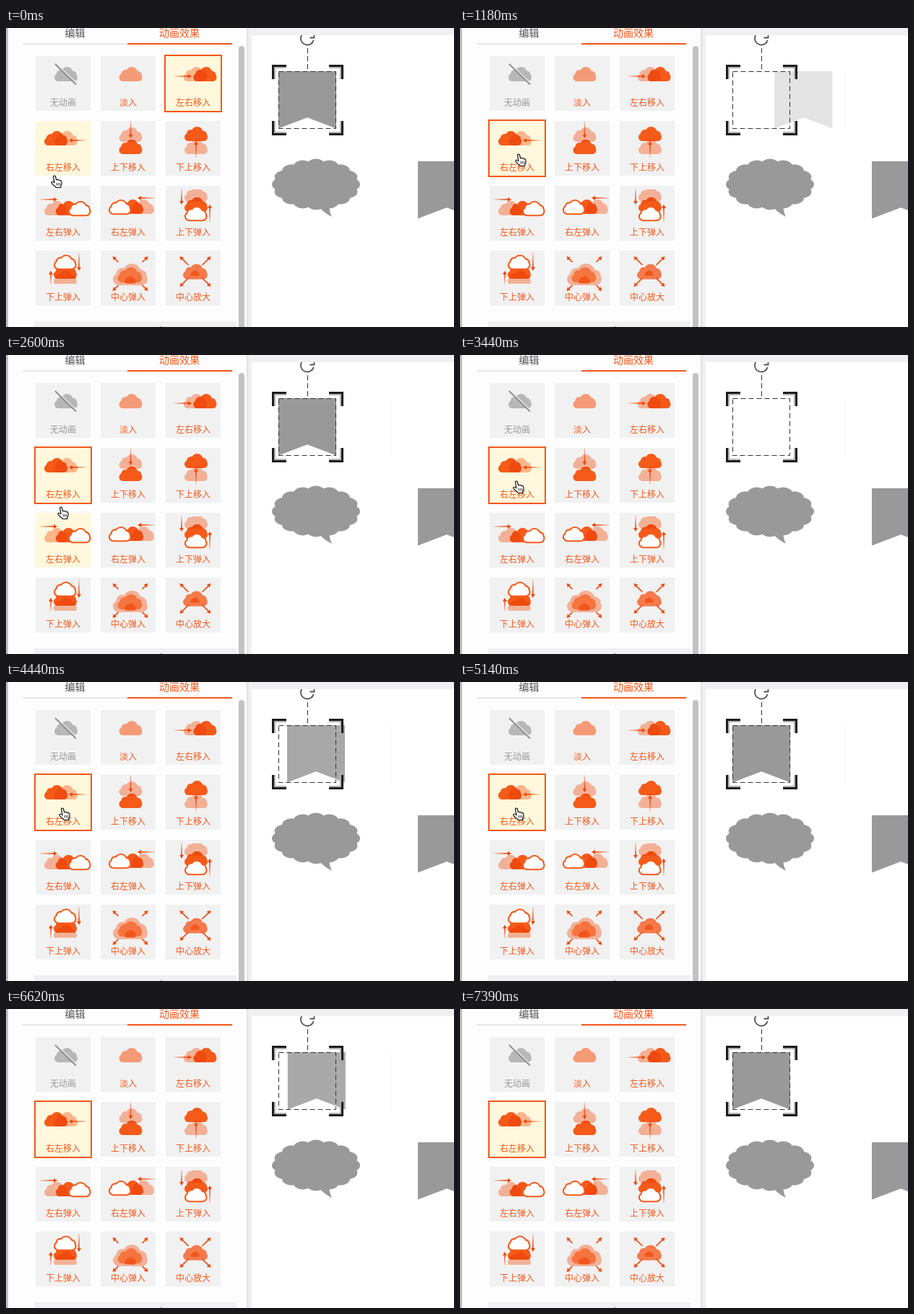
These frames come from a looping animation (620x415 px, 8.59 s). An HTML page with a canvas:

```html
<!DOCTYPE html>
<html lang="zh-CN">
<head>
<meta charset="utf-8">
<title>动画效果</title>
<style>
html, body { margin: 0; width: 100%; height: 100%; overflow: hidden; background: #fff; }
canvas { display: block; width: 620px; height: 415px; }
</style>
</head>
<body>
<canvas id="stage" width="620" height="415"></canvas>
<script>
const ctx = document.getElementById('stage').getContext('2d');
const LOOP = 8590;
const FONT = '"Noto Sans CJK SC", "Noto Sans CJK", "Noto Sans", sans-serif';
const ORANGE = '#f4571b', SOLID = '#f55a19', DEEP = '#ef4a0f';
const PALE = 'rgba(244,87,27,.42)', GREY = '#999';
const LABELS = ['无动画', '淡入', '左右移入', '右左移入', '上下移入', '下上移入',
  '左右弹入', '右左弹入', '上下弹入', '下上弹入', '中心弹入', '中心放大'];

// Slide-in previews: when the ribbon hides, reappears, and the easing begins
const SLIDES = [
  { hide: 850, show: 1070, start: 850 },
  { hide: 3440, show: 3690, start: 3475 },
  { hide: 5640, show: 5870, start: 5675 }
];
const SLIDE_TIME = 1750, SLIDE_DIST = 80;

// Pointer path: time, x, y
const POINTER = [
  [0, 62, 204], [30, 62, 204], [490, 76, 174], [2200, 76, 174], [2450, 70, 224],
  [2750, 71, 196], [2870, 73, 174], [5840, 73, 174], [6200, 170, 317], [6430, 235, 418]
];
const HAND = new Path2D('M3.6 2.2Q3.4 .7 4.8 .6Q6.2 .5 6.6 2L7.6 6.4Q9.3 5 10.2 6.6' +
  'Q11.8 5.6 12.6 7.4Q14.4 6.6 14.8 8.8L15.2 11.5Q15 13.8 13.6 15.2L13.8 17H7.2L6.8 16' +
  'Q3.6 14 1.2 10.8Q.4 9.2 1.7 8.8Q3 8.4 5 10.4Z');

function rect(x, y, w, h, color) {
  ctx.fillStyle = color;
  ctx.fillRect(x, y, w, h);
}

function fill(path, color) {
  ctx.fillStyle = color;
  ctx.fill(path);
}

function line(x0, y0, x1, y1, color, width) {
  ctx.strokeStyle = color;
  ctx.lineWidth = width;
  ctx.beginPath();
  ctx.moveTo(x0, y0);
  ctx.lineTo(x1, y1);
  ctx.stroke();
}

function text(str, x, y, size, color) {
  ctx.font = size + 'px ' + FONT;
  ctx.textAlign = 'center';
  ctx.fillStyle = color;
  ctx.fillText(str, x, y);
}

function clipped(x, y, w, h, paint) {
  ctx.save();
  ctx.beginPath();
  ctx.rect(x, y, w, h);
  ctx.clip();
  paint();
  ctx.restore();
}

// Cloud outline, 32 by 20 at scale 1
function cloud(x, y, s = 1) {
  const p = new Path2D();
  const bump = (cx, cy, r) => {
    p.moveTo(x + (cx + r) * s, y + cy * s);
    p.arc(x + cx * s, y + cy * s, r * s, 0, Math.PI * 2);
  };
  p.roundRect(x, y + 9 * s, 32 * s, 11 * s, 5.5 * s);
  bump(17.5, 8.4, 8.4);
  bump(8.6, 9.6, 5.6);
  bump(25, 11.6, 6.2);
  return p;
}

function overlap(a, b) {
  ctx.save();
  ctx.clip(a);
  fill(b, DEEP);
  ctx.restore();
}

function pair(px, py, sx, sy) {
  const pale = cloud(px, py), solid = cloud(sx, sy);
  fill(pale, PALE);
  fill(solid, SOLID);
  overlap(pale, solid);
}

function hollow(x, y) {
  const p = cloud(x + 2, y + 2, .86);
  ctx.strokeStyle = SOLID;
  ctx.lineWidth = 4.2;
  ctx.stroke(p);
  fill(p, '#fff');
}

function arrow(x0, y0, x1, y1, fade = true) {
  const len = Math.hypot(x1 - x0, y1 - y0);
  const ux = (x1 - x0) / len, uy = (y1 - y0) / len;
  const bx = x1 - ux * 5, by = y1 - uy * 5;
  const g = ctx.createLinearGradient(x0, y0, x1, y1);
  g.addColorStop(0, fade ? 'rgba(238,68,9,.15)' : DEEP);
  g.addColorStop(.75, DEEP);
  line(x0, y0, bx, by, g, 1.7);
  ctx.fillStyle = DEEP;
  ctx.beginPath();
  ctx.moveTo(x1, y1);
  ctx.lineTo(bx - uy * 3, by + ux * 3);
  ctx.lineTo(bx + uy * 3, by - ux * 3);
  ctx.fill();
}

function corners(cx, cy, rx, ry, len) {
  for (const i of [-1, 1]) for (const j of [-1, 1])
    arrow(cx + i * (rx - len), cy + j * (ry - len), cx + i * rx, cy + j * ry, false);
}

const ICONS = [
  () => {
    fill(cloud(67, 54), '#b7b7b7');
    line(69.5, 49.5, 98.5, 77.5, '#f1f1f1', 1.5);
    line(68, 50, 97, 78.5, '#8c8c8c', 1.8);
  },
  () => fill(cloud(156.5, 54), '#f59a76'),
  () => { pair(246, 54, 259.5, 54); arrow(233, 67, 257, 67); },
  () => { pair(67, 143, 53, 143); arrow(111, 156, 87, 156); },
  () => { pair(156.5, 138, 156.5, 155); arrow(172.5, 129, 172.5, 153); },
  () => { pair(247, 155, 247, 137); arrow(263, 180, 263, 157); },
  () => { pair(53, 240, 69, 240); hollow(86, 240); arrow(47, 238, 71, 238); },
  () => { pair(173, 238, 158, 238); hollow(142, 238); arrow(206, 236, 182, 236); },
  () => {
    clipped(240, 224, 46, 46, () => pair(247, 221, 247, 235));
    hollow(247, 247);
    arrow(243, 223, 243, 245);
    arrow(282, 270, 282, 245);
  },
  () => {
    clipped(60, 310, 46, 45, () => pair(66, 337, 66, 328));
    hollow(66, 314.5);
    arrow(62, 356, 62, 337);
    arrow(101, 312, 101, 337);
  },
  () => {
    fill(cloud(148, 327, 1.5), PALE);
    fill(cloud(154.5, 332, 1.06), '#f5743f');
    fill(cloud(164, 344.5, .5), '#f0561c');
    corners(172, 341, 24.5, 24, 8);
  },
  () => {
    fill(cloud(245, 327.5, 1.06), '#f57a4c');
    fill(cloud(255.5, 336.5, .38), '#f2561c');
    corners(262, 338, 21.5, 21, 12);
  }
];

function ribbon(x, y) {
  const p = new Path2D();
  p.moveTo(x, y);
  p.lineTo(x + 80, y);
  p.lineTo(x + 80, y + 79.5);
  p.lineTo(x + 40, y + 64.3);
  p.lineTo(x, y + 79.5);
  p.closePath();
  return p;
}

function bubble() {
  const p = new Path2D(), n = 16;
  p.ellipse(429, 217, 51, 28, 0, 0, Math.PI * 2);
  for (let i = 0; i < n; i++) {
    const a = i / n * Math.PI * 2;
    const x = 429 + 48 * Math.cos(a), y = 217 + 26.5 * Math.sin(a);
    p.moveTo(x + 13, y);
    p.ellipse(x, y, 13, 9, 0, 0, Math.PI * 2);
  }
  p.moveTo(448, 243);
  p.quadraticCurveTo(446, 252, 451, 262);
  p.quadraticCurveTo(439, 256, 432, 247);
  p.closePath();
  return p;
}

// cubic-bezier(.25, .1, .25, 1)
function ease(u) {
  if (u <= 0) return 0;
  if (u >= 1) return 1;
  const at = (s, a, b) => 3 * (1 - s) * (1 - s) * s * a + 3 * (1 - s) * s * s * b + s * s * s;
  let lo = 0, hi = 1;
  for (let i = 0; i < 24; i++) {
    const mid = (lo + hi) / 2;
    if (at(mid, .25, .25) < u) lo = mid; else hi = mid;
  }
  return at(lo, .1, 1);
}

function slideProgress(t) {
  const slide = SLIDES.filter(s => t >= s.hide).pop();
  if (!slide) return 1;
  return t < slide.show ? 0 : ease((t - slide.start) / SLIDE_TIME);
}

function drawPanel(t) {
  rect(0, 0, 333, 415, '#fdfdfd');
  rect(0, 0, 3, 415, '#bfbfbf');
  text('编辑', 95.5, 12, 14, '#555');
  text('动画效果', 240, 12, 14, ORANGE);
  rect(23, 21, 145, 2, '#e8e8e8');
  rect(168, 21, 145, 2, ORANGE);
  rect(39, 407, 280, 8, '#f0f0f0');
  rect(213, 414, 3, 1, '#aaa');
  if (t < 6450) {
    ctx.fillStyle = '#c2c2c2';
    ctx.beginPath();
    ctx.roundRect(322, 25, 8, 400, 4);
    ctx.fill();
  }

  const selected = t < 700 ? 2 : 3;
  const hovered = t < 700 ? 3 : t > 2400 && t < 2620 ? 6 : -1;
  LABELS.forEach((label, i) => {
    const x = 41 + i % 3 * 90, y = 39 + Math.floor(i / 3) * 90;
    const lit = i === selected || i === hovered;
    if (i === selected) rect(x - 2, y - 2, 80, 80, ORANGE);
    rect(x, y, 76, 76, lit ? '#fff8dc' : '#f1f1f1');
    ICONS[i]();
    text(label, x + 38, y + 69, 12, i ? ORANGE : GREY);
  });
}

function bracket(x, y, dx, dy) {
  ctx.save();
  ctx.translate(x, y);
  ctx.scale(dx, dy);
  const ell = (o, w, color) => {
    ctx.strokeStyle = color;
    ctx.lineWidth = w;
    ctx.beginPath();
    ctx.moveTo(20, o);
    ctx.lineTo(o, o);
    ctx.lineTo(o, 20);
    ctx.stroke();
  };
  ell(1.5, 3, '#1c1c1c');
  ell(4, 2, '#b5b5b5');
  ctx.restore();
}

// Rotate handle, cut off by the toolbar edge
function rotateHandle() {
  ctx.strokeStyle = '#555';
  ctx.lineWidth = 1.8;
  ctx.beginPath();
  ctx.arc(417, 14.5, 9, .25, Math.PI * 1.5);
  ctx.moveTo(420.5, 13.5);
  ctx.lineTo(426.5, 13.5);
  ctx.lineTo(426.5, 8);
  ctx.stroke();
}

function drawCanvas(t) {
  rect(333, 0, 287, 415, '#f0f0f0');
  rect(333, 0, 1, 415, '#dedede');
  rect(334, 0, 2, 415, '#e9e9e9');
  rect(340, 10, 280, 405, '#fff');

  const p = slideProgress(t);
  if (t >= 1070 && t < 6700) rect(532, 61, 2, 79, '#f8f8f8');
  ctx.globalAlpha = p;
  fill(ribbon(377 + SLIDE_DIST * (1 - p), 60), GREY);
  ctx.globalAlpha = 1;
  fill(ribbon(570, 185), GREY);
  fill(bubble(), GREY);

  ctx.setLineDash([7, 4]);
  ctx.strokeStyle = '#333';
  ctx.lineWidth = 1;
  ctx.strokeRect(377.5, 60.5, 79, 79);
  line(417.5, 28, 417.5, 60, '#333', 1);
  ctx.setLineDash([]);

  bracket(368, 51, 1, 1);
  bracket(467, 51, -1, 1);
  bracket(368, 149, 1, -1);
  bracket(467, 149, -1, -1);
  clipped(400, 10, 40, 20, rotateHandle);
}

function drawPointer(t) {
  const k = POINTER.findIndex(key => key[0] > t);
  if (k < 0) return;
  const [t0, x0, y0] = POINTER[k - 1], [t1, x1, y1] = POINTER[k];
  const u = (t - t0) / (t1 - t0);
  ctx.save();
  ctx.translate(Math.round(x0 + (x1 - x0) * u), Math.round(y0 + (y1 - y0) * u) + .5);
  fill(HAND, '#fff');
  ctx.strokeStyle = '#111';
  ctx.lineWidth = 1.2;
  ctx.lineJoin = 'round';
  ctx.stroke(HAND);
  for (const x of [8, 10.2, 12.4]) line(x, 10.5, x + .5, 14, '#222', .9);
  ctx.restore();
}

function draw(t) {
  drawCanvas(t);
  drawPanel(t);
  drawPointer(t);
}

const began = performance.now();
function tick() {
  draw((performance.now() - began) % LOOP);
  requestAnimationFrame(tick);
}
tick();
</script>
</body>
</html>
```
